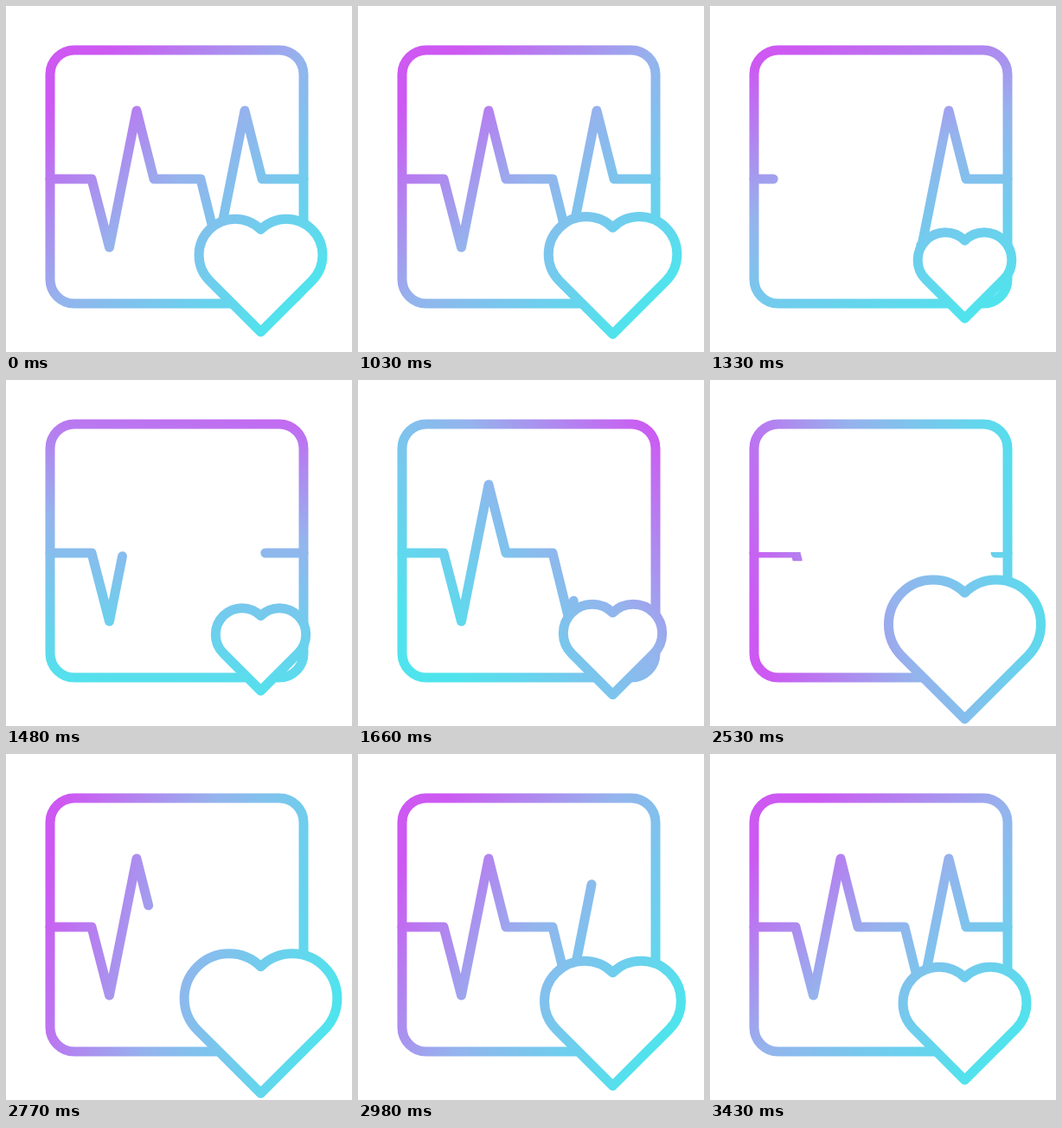
An HTML page that plays this animation: 400x400 px, repeating every 3460 ms.

```html
<!DOCTYPE html>
<html lang="en">
<head>
<meta charset="utf-8">
<title>Heartbeat</title>
<style>
  html, body { margin: 0; width: 100%; height: 100%; overflow: hidden; background: #fff; }
  svg { display: block; width: 100vw; height: 100vh; }
</style>
</head>
<body>
<svg viewBox="0 0 400 400">
  <defs>
    <linearGradient id="tint" gradientUnits="userSpaceOnUse">
      <stop offset="0" stop-color="#cd58f2"/>
      <stop offset=".452" stop-color="#95b3ed"/>
      <stop offset="1" stop-color="#4fe4ed"/>
    </linearGradient>
    <clipPath id="band"><rect id="bandBox" x="0" width="400"/></clipPath>
  </defs>
  <g fill="none" stroke="url(#tint)" stroke-width="11" stroke-linecap="round" stroke-linejoin="round">
    <g clip-path="url(#band)">
      <path id="head"/>
      <path id="tail"/>
    </g>
    <rect x="51" y="51" width="293" height="293" rx="28"/>
    <path id="heart" fill="#fff"/>
  </g>
</svg>
<script>
const LOOP = 3460, START = 1030, STEP = 30, END = 3430;
const $ = id => document.getElementById(id);
const clamp = x => Math.min(1, Math.max(0, x));
const smooth = x => x * x * (3 - 2 * x);
const ramp = (t, a, b) => smooth(clamp((t - a) / (b - a)));

const pulse = [[51, 200], [99, 200], [119.5, 279], [151, 121], [171, 200],
  [225, 200], [244.5, 279], [276, 121], [296, 200], [344, 200]];
const marks = [0];
for (let i = 1; i < pulse.length; i++) {
  marks.push(marks[i - 1] + Math.hypot(pulse[i][0] - pulse[i - 1][0], pulse[i][1] - pulse[i - 1][1]));
}
const total = marks[marks.length - 1];

const beat = [[1000, 1], [1126, 1.28], [1370, .72], [1660, .8], [2080, 1.12],
  [2530, 1.232], [2635, 1.28], [2980, 1.105], [3190, 1]];

// Hermite spline that stays flat at peaks and ends
function slope(keys, i) {
  const p = keys[i - 1], k = keys[i], n = keys[i + 1];
  if (!p || !n || (k[1] - p[1]) * (n[1] - k[1]) <= 0) return 0;
  return (n[1] - p[1]) / (n[0] - p[0]);
}
function spline(keys, t) {
  const last = keys.length - 1;
  if (t <= keys[0][0]) return keys[0][1];
  if (t >= keys[last][0]) return keys[last][1];
  let i = 0;
  while (t > keys[i + 1][0]) i++;
  const [t0, v0] = keys[i], [t1, v1] = keys[i + 1];
  const d = t1 - t0, u = (t - t0) / d, w = 1 - u;
  return v0 + (v1 - v0) * smooth(u) + d * u * w * (w * slope(keys, i) - u * slope(keys, i + 1));
}

function bezier(x, x1, x2) {
  let lo = 0, hi = 1;
  for (let i = 0; i < 24; i++) {
    const u = (lo + hi) / 2, w = 1 - u;
    if (3 * u * w * w * x1 + 3 * u * u * w * x2 + u * u * u < x) lo = u; else hi = u;
  }
  return smooth(lo);
}

function cut(from, to) {
  const at = s => {
    let i = 0;
    while (i < pulse.length - 2 && s > marks[i + 1]) i++;
    const u = (s - marks[i]) / (marks[i + 1] - marks[i]);
    return pulse[i].map((v, k) => v + (pulse[i + 1][k] - v) * u);
  };
  if (to - from < .5) return [];
  return [at(from), ...pulse.filter((p, i) => marks[i] > from && marks[i] < to), at(to)];
}
const line = pts => pts.length ? "M" + pts.map(p => p.map(v => v.toFixed(2)).join()).join("L") : "";

function drawPulse(t) {
  let gone, grown;
  if (t < 1955) {
    gone = ramp(t, 1000, 1560);
    grown = ramp(t, 1266, 1909);
  } else {
    gone = ramp(t, 2000, 2575);
    grown = ramp(t, 2397, 3215);
  }
  const head = cut(0, grown * total);
  const tail = cut(Math.max(gone, grown) * total, total);
  $("head").setAttribute("d", line(head));
  $("tail").setAttribute("d", line(tail));

  // a nearly flat trace is cropped to its own height
  const ys = [...head, ...tail].map(p => p[1]);
  const top = Math.min(...ys), low = Math.max(...ys);
  const flat = ys.length > 0 && low - top < 30;
  $("bandBox").setAttribute("y", flat ? top - 1 : 0);
  $("bandBox").setAttribute("height", flat ? low - top + 2 : 400);
}

function drawHeart(s) {
  const x = 294.5, y = 311.5 - 23.5 * s, d = 29.6 * s, r = d * Math.SQRT2;
  const arc = `A${r} ${r} 0 0 0 `;
  $("heart").setAttribute("d",
    `M${x} ${y - d}${arc}${x - 2 * d} ${y + d}L${x} ${y + 3 * d}L${x + 2 * d} ${y + d}${arc}${x} ${y - d}Z`);
}

function drawTint(k) {
  const a = Math.PI * (.25 + 2 * k), c = Math.cos(a), s = Math.sin(a);
  const shift = -40 * Math.max(0, Math.sin(2 * Math.PI * k));
  const from = shift - 165, to = shift + 200;
  const ends = { x1: 200 + c * from, y1: 200 + s * from, x2: 200 + c * to, y2: 200 + s * to };
  for (const key in ends) $("tint").setAttribute(key, ends[key]);
}

function draw(ms) {
  let t = ms % LOOP;
  t = t < START ? 1000 : START + Math.floor((t - START) / STEP) * STEP;
  drawTint(bezier(clamp((t - START) / (END - START)), .3, .4));
  drawPulse(t);
  drawHeart(spline(beat, t));
}

const t0 = performance.now();
function tick() {
  draw(performance.now() - t0);
  requestAnimationFrame(tick);
}
tick();
</script>
</body>
</html>
```
